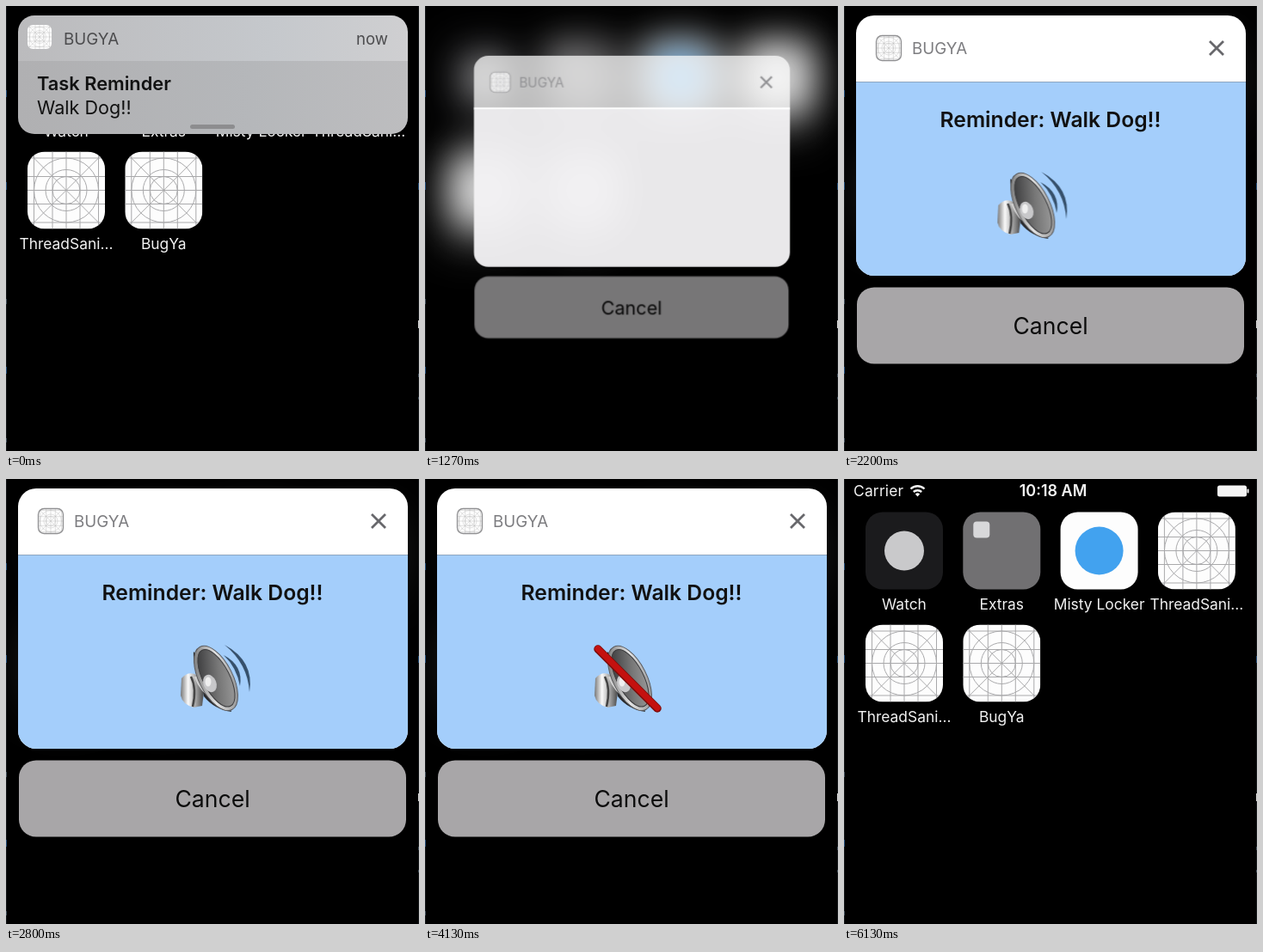
These frames come from a looping animation (480 by 518 pixels, 6.27 s). An HTML page:

```html
<!DOCTYPE html>
<html lang="en">
<head>
<meta charset="utf-8">
<title>Task reminder</title>
<style>
html, body { margin: 0; width: 100%; height: 100%; overflow: hidden; background: #000; }
svg { position: absolute; left: 0; top: 0; width: 480px; height: 518px; overflow: hidden; transform-origin: 240px 259px; }
text { font-family: Inter, "Open Sans", sans-serif; }
.label { font-size: 17.4px; fill: #f2f2f2; text-anchor: middle; }
.mid { text-anchor: middle; }
.end { text-anchor: end; }
.bold { font-weight: 600; }
</style>
</head>
<body>
<svg>
  <defs>
    <linearGradient id="metal" x1="0" y1="0" x2="1" y2="0">
      <stop offset="0" stop-color="#777"/><stop offset=".3" stop-color="#fafafa"/>
      <stop offset=".65" stop-color="#999"/><stop offset="1" stop-color="#333"/>
    </linearGradient>
    <linearGradient id="rim" x1="0" y1="0" x2="1" y2="1">
      <stop offset="0" stop-color="#555"/><stop offset=".5" stop-color="#e4e4e4"/><stop offset="1" stop-color="#777"/>
    </linearGradient>
    <linearGradient id="cone" x1="0" y1="0" x2="1" y2="1">
      <stop offset="0" stop-color="#2d2d2f"/><stop offset=".55" stop-color="#777"/><stop offset="1" stop-color="#a5a5a5"/>
    </linearGradient>
    <linearGradient id="glassTop">
      <stop offset="0" stop-color="#bbbbbd"/><stop offset=".65" stop-color="#c5c8cc"/><stop offset="1" stop-color="#cfcfd1"/>
    </linearGradient>
    <linearGradient id="glass">
      <stop offset="0" stop-color="#b0b0b2"/><stop offset=".6" stop-color="#b5b7ba"/><stop offset="1" stop-color="#bdbdbf"/>
    </linearGradient>
    <clipPath id="bannerClip"><rect x="14" y="11" width="453" height="138" rx="19"/></clipPath>
    <clipPath id="cardClip"><rect x="14" y="11" width="453" height="303" rx="21"/></clipPath>
    <clipPath id="tileClip"><rect width="90" height="90" rx="20"/></clipPath>
    <g id="grid" clip-path="url(#tileClip)">
      <rect width="90" height="90" fill="#fdfdfd"/>
      <g fill="none" stroke="#a9a9ab">
        <path d="M7.500 0V90M29 0V90M45 0V90M61 0V90M82.500 0V90M0 7.500H90M0 29H90M0 45H90M0 61H90M0 82.500H90M0 0L90 90M90 0L0 90"/>
        <circle cx="45" cy="45" r="37.500"/><circle cx="45" cy="45" r="24"/><circle cx="45" cy="45" r="16"/>
      </g>
    </g>
  </defs>
</svg>

<svg id="home" viewBox="0 0 480 518">
  <g id="status" fill="#f4f4f4">
    <text x="11" y="20" font-size="17.400" letter-spacing=".2">Carrier</text>
    <path d="M77.500 11.500a11.500 11.500 0 0 1 16 0M80.800 15a7 7 0 0 1 9.400 0" fill="none" stroke="#f4f4f4" stroke-width="2.400"/>
    <path d="M82.800 17.400a4 4 0 0 1 5.400 0L85.500 20.400Z"/>
    <text class="mid bold" x="243" y="20" font-size="18">10:18 AM</text>
    <rect x="434" y="7.500" width="34" height="13" rx="2.500"/>
    <rect x="468.500" y="11.500" width="2" height="5" rx="1"/>
  </g>
  <g id="tiles"></g>
</svg>

<svg id="banner" viewBox="0 0 480 518">
  <g clip-path="url(#bannerClip)">
    <rect x="14" y="11" width="453" height="54" fill="url(#glassTop)"/>
    <rect x="14" y="64" width="453" height="86" fill="url(#glass)"/>
  </g>
  <use href="#grid" transform="translate(25 22) scale(.311)"/>
  <g fill="#111">
    <text x="67" y="45" font-size="18.800" fill="#4c4c4e">BUGYA</text>
    <text class="end" x="444" y="44.500" font-size="18.600" fill="#4c4c4e">now</text>
    <text class="bold" x="36" y="98" font-size="21.800">Task Reminder</text>
    <text x="36" y="126" font-size="21.600">Walk Dog!!</text>
  </g>
  <rect x="214" y="138" width="52" height="5" rx="2.500" fill="#8d8d8f"/>
</svg>

<svg id="sheet" viewBox="0 0 480 518">
  <g clip-path="url(#cardClip)">
    <rect id="head" x="14" y="11" width="453" height="77" fill="#fff"/>
    <rect x="14" y="88" width="453" height="227" fill="#f3f2f4" fill-opacity=".96"/>
    <path d="M14 87H467" stroke="#fff" stroke-width="3"/>
    <g id="panel">
      <rect x="14" y="88" width="453" height="227" fill="#a4cefb"/>
      <path d="M14 88.500H467" stroke="#8ea6c0"/>
      <text class="mid bold" x="240" y="141" font-size="24.700" fill="#111">Reminder: Walk Dog!!</text>
      <g id="speaker">
        <path d="M198 232Q205 224 213 227L226 233L222 264L212 266Q199 262 197 252Z" fill="url(#metal)"/>
        <path d="M209 230Q216 244 211 265" fill="none" stroke="#444" stroke-width="2.500"/>
        <path d="M212 201Q211 222 222 234L224 253Q236 268 256 271L240 228Z" fill="#29292b"/>
        <path d="M214 230Q221 247 235 256" fill="none" stroke="#d0d0d0" stroke-width="3"/>
        <g transform="rotate(-27 238 232)">
          <ellipse cx="238" cy="232" rx="19.500" ry="41" fill="url(#rim)" stroke="#59595b"/>
          <ellipse cx="238.500" cy="232" rx="15.500" ry="36.500" fill="url(#cone)" stroke="#3a3a3c"/>
        </g>
        <ellipse cx="231" cy="238" rx="7.500" ry="10.500" transform="rotate(-22 231 238)" fill="#c8c8ca"/>
        <ellipse cx="229" cy="236" rx="3.500" ry="5.500" fill="#efefef"/>
        <g id="waves" fill="#36506b">
          <path d="M248 193Q283 212 277 248Q275 215 248 193Z"/>
          <path d="M247 205Q270 217 266 241Q262 219 247 205Z"/>
        </g>
        <g id="mute" stroke-linecap="round">
          <path d="M201 198L270 267" stroke="#7d0c0a" stroke-width="9.500"/>
          <path d="M201 197.500L270 266.500" stroke="#c4110f" stroke-width="7"/>
        </g>
      </g>
    </g>
  </g>
  <g id="title">
    <g transform="translate(37 34) scale(.333)">
      <use href="#grid"/>
      <rect x="1.500" y="1.500" width="87" height="87" rx="20" fill="none" stroke="#909092" stroke-width="4"/>
    </g>
    <text x="79" y="56" font-size="18.800" fill="#7d7d80">BUGYA</text>
    <path d="M425 41L441 57M441 41L425 57" stroke="#68686c" stroke-width="2.800"/>
  </g>
  <g id="cancel">
    <rect x="15" y="327.500" width="450" height="89" rx="20" fill="#a8a6a8"/>
    <text class="mid" x="240" y="382" font-size="26.600" fill="#0c0c0c">Cancel</text>
  </g>
</svg>

<svg viewBox="0 0 480 518">
  <path d="M.5 0V518M479.500 0V518" stroke="#17191b"/>
  <path d="M.5 98V106M.5 205V214M.5 420V428M479.500 206V214" stroke="#27507c"/>
  <path d="M.5 341V347M.5 503V508M479.500 428V432M479.500 455V458" stroke="#46525e"/>
  <path d="M479.500 366V375" stroke="#ddd"/>
</svg>

<script>
const LOOP = 6270, MUTE = 3600;
const start = document.timeline.currentTime || 0;
const $ = id => document.getElementById(id);

const rect = (x, y, size, r, fill) =>
  `<rect x="${x}" y="${y}" width="${size}" height="${size}" rx="${r}" fill="${fill}"/>`;
const dot = (r, fill) => `<circle cx="45" cy="45" r="${r}" fill="${fill}"/>`;
const blank = '<use href="#grid"/>';
const apps = [
  ['Watch', rect(0, 0, 90, 20, '#1b1b1d') + dot(23, '#c9c9cb')],
  ['Extras', rect(0, 0, 90, 20, '#717072') + rect(12, 11, 19, 4, '#d8d8da')],
  ['Misty Locker', rect(0, 0, 90, 20, '#fdfdfd') + dot(28, '#42a2ef')],
  ['ThreadSani...', blank],
  ['ThreadSani...', blank],
  ['BugYa', blank]
];
$('tiles').innerHTML = apps.map(([name, art], i) => {
  const x = 25 + (i % 4) * 113.3, y = 38.5 + Math.floor(i / 4) * 131;
  return `<g transform="translate(${x} ${y})">${art}<text class="label" x="45" y="113.5">${name}</text></g>`;
}).join('');

// Steps are [time in ms, properties, easing]; the ends repeat the outer steps.
function play(id, steps) {
  const all = [[0, steps[0][1]], ...steps, [LOOP, steps[steps.length - 1][1]]];
  const frames = all.map(([t, props, easing = 'linear']) => ({ ...props, offset: t / LOOP, easing }));
  $(id).animate(frames, { duration: LOOP, iterations: Infinity }).startTime = start;
}
const fade = opacity => ({ opacity });
const pose = (scale, opacity) => ({ transform: `scale(${scale})`, opacity });
const haze = (px, light) => ({ filter: `blur(${px}px) brightness(${light})` });
const shift = x => ({ transform: `translateX(${x}px)` });

play('home', [
  [800, haze(0, 1)], [1270, haze(21, .9)], [1560, haze(26, .16)],
  [4870, haze(26, .16), 'ease-out'], [5130, haze(1.5, 1)], [5200, haze(.7, 1)], [5470, haze(0, 1)]
]);
play('status', [[4860, fade(0)], [4870, fade(1)]]);
play('banner', [
  [800, pose(1, 1), 'ease-in-out'], [1130, pose(.82, 1)], [1220, pose(.8, 0)]
]);
play('sheet', [
  [1130, pose(.79, 0)], [1220, pose(.805, 1)], [1300, pose(.815, 1), 'ease-out'],
  [1560, pose(1.008, 1)], [1650, pose(1.008, 1), 'ease-in-out'], [1850, pose(1, 1)],
  [4870, pose(1, 1), 'ease-in'], [5130, pose(.86, 0)]
]);
play('head', [[1300, { fillOpacity: .72 }], [1480, { fillOpacity: 1 }]]);
play('title', [[1300, fade(.7)], [1480, fade(1)]]);
play('cancel', [[1300, fade(.71)], [1500, fade(1)]]);
play('panel', [[1330, fade(0)], [1480, fade(1)]]);
play('waves', [[MUTE - 1, fade(1)], [MUTE, fade(0)]]);
play('mute', [[MUTE - 1, fade(0)], [MUTE, fade(1)]]);

// The speaker shakes sideways until it is muted.
const shake = [[1450, shift(0)]];
for (let t = 1480; t < MUTE; t += 20)
  shake.push([t, shift(20 * Math.sin((t - 1541) / 365 * 2 * Math.PI))]);
play('speaker', [...shake, [MUTE, shift(0)]]);
</script>
</body>
</html>
```
